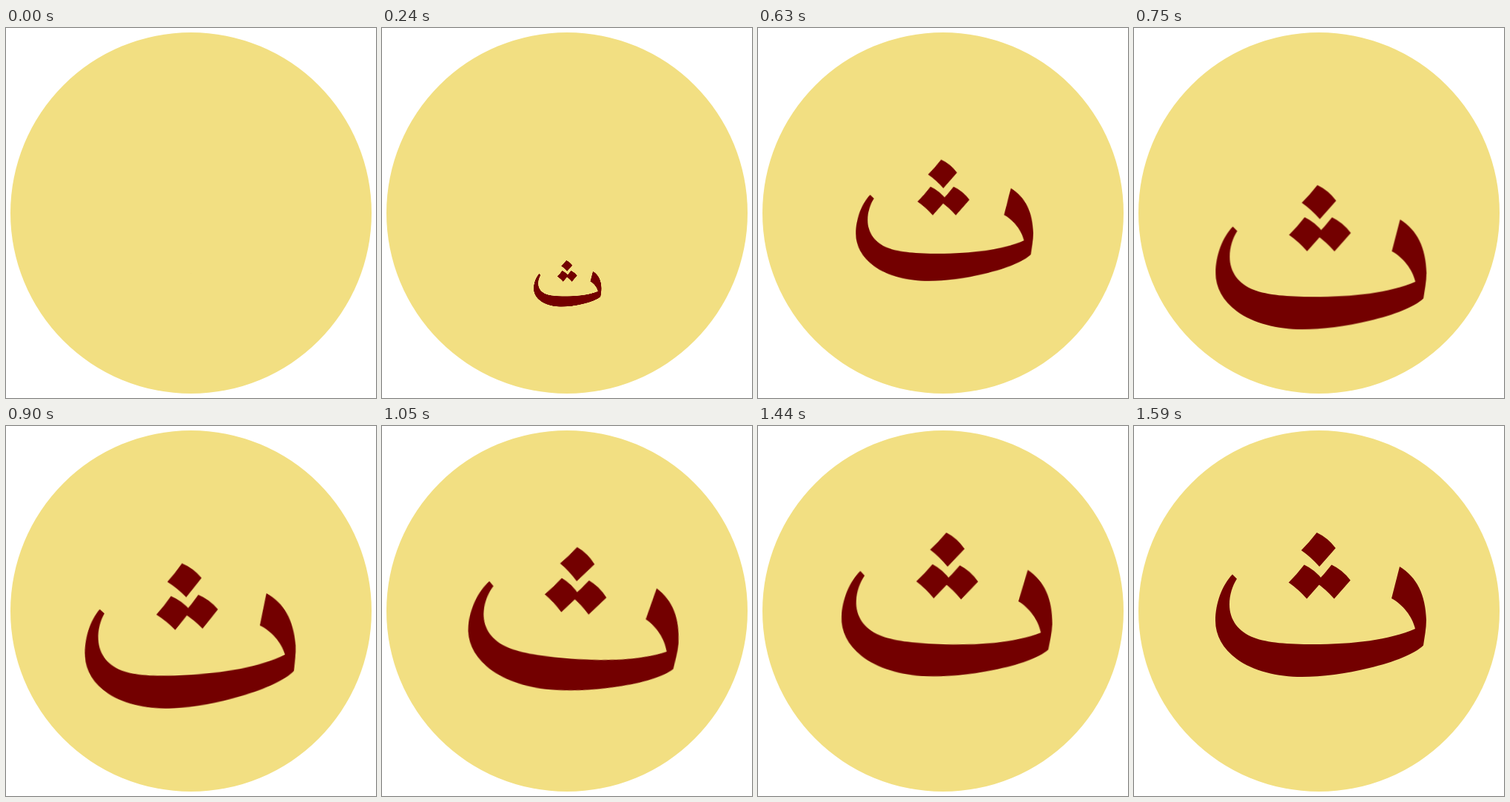
An HTML page without scripts that plays this animation: 500x500 px, repeating every 2100 ms.

```html
<!DOCTYPE html>
<html lang="ar">
<head>
<meta charset="utf-8">
<title>ث</title>
<style>
  html, body { margin: 0; width: 100%; height: 100%; overflow: hidden; background: #fff; }
  svg { display: block; width: 100%; height: 100%; }

  /* All motion pivots on the middle of the letter's baseline. */
  .bounce, .wiggle, .grow {
    transform-origin: 250px 332px;
    animation: 2100ms linear infinite;
  }
  .bounce { animation-name: bounce; }
  .wiggle { animation-name: wiggle; }
  .grow { animation-name: grow; }

  @keyframes grow {
    0% { transform: scale(0); }
    35.714%, 100% { transform: scale(1); }
  }

  @keyframes bounce {
    0% { transform: translateY(0); animation-timing-function: cubic-bezier(.37, 0, .63, 1); }
    17.86% { transform: translateY(59px); animation-timing-function: cubic-bezier(.37, 0, .63, 1); }
    25.6% { transform: translateY(-40px); animation-timing-function: cubic-bezier(.37, 0, .63, 1); }
    35.714% { transform: translateY(68.5px); animation-timing-function: cubic-bezier(.33, .5, .67, .93); }
    61.43%, 100% { transform: translateY(0); }
  }

  @keyframes wiggle {
    0%, 35.714% { transform: rotate(0deg); animation-timing-function: ease-out; }
    39.05%, 52.38%, 65.71% { transform: rotate(10deg); animation-timing-function: cubic-bezier(.45, 0, .55, 1); }
    45.71%, 59.05% { transform: rotate(-10deg); animation-timing-function: cubic-bezier(.45, 0, .55, 1); }
    72.38% { transform: rotate(-10deg); animation-timing-function: ease-in; }
    75.714%, 100% { transform: rotate(0deg); }
  }
</style>
</head>
<body>
<svg viewBox="0 0 500 500" role="img" aria-label="ث">
  <circle cx="250" cy="250" r="244" fill="#f2df82"/>
  <g class="bounce"><g class="wiggle"><g class="grow" fill="#730000">
    <path id="dot" d="M247 144Q262 151 272.5 165Q262 177 250.5 190Q239 177 226 168Q237 157 247 144Z"/>
    <use href="#dot" x="-17" y="43.5"/>
    <use href="#dot" x="20" y="43.5"/>
    <path d="M133 200.5L139 206.5C133 216 129 228 129 241C129 262 141 278 162 286
      C180 293 208 295 242 295C296 295 346 289 380 274C376 257 363 241 348 233
      L359 190C382 204 394 228 395 262C395 274 392.5 286 391 296.5
      C379 308 352 319 318 327C286 335 254 339 227 339C194 339 161 331 139 315
      C120 301 110 283 110 263C110 240 119 215 133 200.5Z"/>
  </g></g></g>
</svg>
</body>
</html>
```
